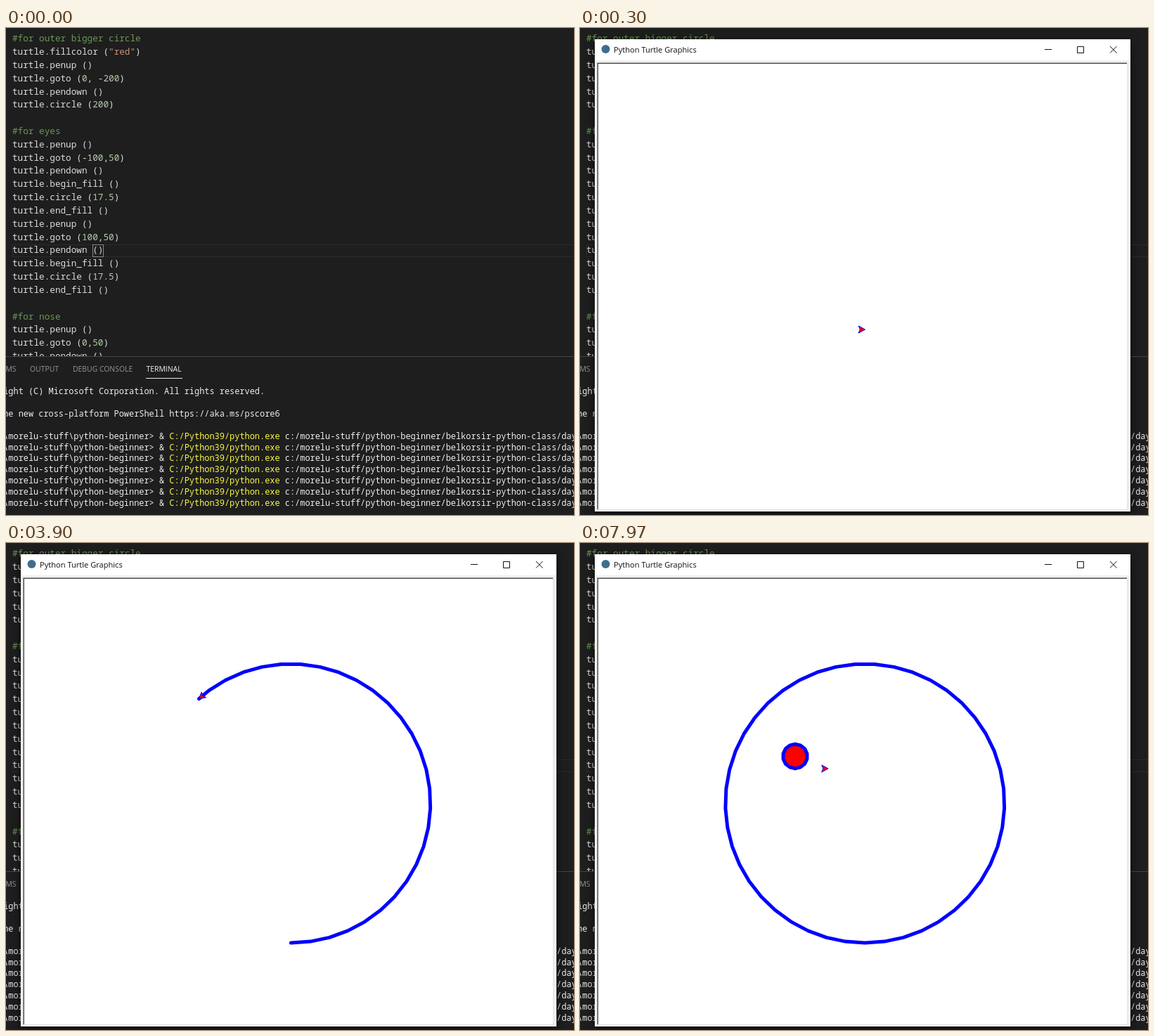
These frames come from a looping animation (808 by 693 pixels, 8 s). An HTML page:

```html
<!DOCTYPE html>
<html lang="en">
<head>
<meta charset="utf-8">
<title>Python Turtle Graphics</title>
<style>
  html, body { margin: 0; width: 100%; height: 100%; overflow: hidden; background: #1e1e1e; }
  #stage { position: absolute; left: 0; top: 0; width: 808px; height: 693px; overflow: hidden; }
  pre { position: absolute; margin: 0; font-family: "Noto Sans Mono", monospace; font-weight: 500; }
  #editor { position: absolute; width: 808px; height: 467px; overflow: hidden; }
  #code { left: 9px; top: 5.2px; font-size: 12.7px; line-height: 18.83px; color: #dcdcdc; }
  #terminal { left: -39.6px; top: 509px; font-size: 11.93px; line-height: 15.9px; color: #eee; }
  .current { position: absolute; left: 9px; top: 308px; width: 820px; height: 16px; border: 1px solid #2b2b2b; }
  .bracket { position: absolute; left: 123px; top: 308px; width: 14px; height: 16px; border: 1px solid #888; }
  .comment { color: #6a9955; }
  .string { color: #ce9178; }
  .number { color: #b5cea8; }
  .command { color: #f9f947; }
  svg { position: absolute; left: 0; top: 0; }
  text { font-family: "Open Sans", sans-serif; }
  #window { transform-origin: 21px 16px; }
  #frame { filter: drop-shadow(0 3px 7px rgba(0, 0, 0, .6)); }
</style>
</head>
<body>
<div id="stage">
  <div id="editor">
    <div class="current"></div>
    <div class="bracket"></div>
    <pre id="code"></pre>
  </div>
  <pre id="terminal"></pre>
  <svg width="808" height="693">
    <path d="M0 467.5H808" stroke="#444"/>
    <g font-size="10.4" fill="#969696">
      <text x="14.5" y="489" text-anchor="end">PROBLEMS</text>
      <text x="34" y="489">OUTPUT</text>
      <text x="95" y="489">DEBUG CONSOLE</text>
      <text x="199.5" y="489" fill="#f0f0f0">TERMINAL</text>
    </g>
    <path d="M199 498.5H251" stroke="#e7e7e7"/>

    <g id="window">
      <rect id="frame" x="21" y="16" width="762" height="672" fill="#f0f0f0"/>
      <rect x="21" y="16" width="762" height="30" fill="#fff"/>
      <rect x="24" y="49" width="755" height="637" fill="#e3e3e3"/>
      <rect x="24" y="49" width="754" height="636" fill="#a0a0a0"/>
      <rect x="25" y="50" width="753" height="635" fill="#505050"/>
      <rect x="26" y="51" width="752" height="634" fill="#fff"/>
      <circle cx="36.5" cy="30" r="6" fill="#3f6e8c"/>
      <text x="48" y="35" font-size="11.1" fill="#111">Python Turtle Graphics</text>
      <path d="M661 30.5h10M707.5 26.5h9v9h-9zM754 26l9.500 9.500M763.500 26l-9.500 9.500" fill="none" stroke="#111"/>
      <g transform="translate(405.3 370.5) scale(.9925 -.9925)" fill="none"
         stroke="#00f" stroke-width="5" stroke-linecap="round" stroke-linejoin="round">
        <polygon id="eyeFill" fill="#f00" stroke="none"/>
        <polyline id="face"/>
        <polyline id="eye"/>
        <polygon id="turtle" points="0,0 -9,5 -7,0 -9,-5" stroke-width="1"/>
      </g>
    </g>
  </svg>
</div>
<script>
const $ = id => document.getElementById(id);

// Editor and terminal text
const call = (name, args = "") => `turtle.${name} (${args})`;
const eye = x => [call("penup"), call("goto", `${x},50`), call("pendown"),
  call("begin_fill"), call("circle", "17.5"), call("end_fill")];
const source = [
  "#for outer bigger circle", call("fillcolor", '"red"'), call("penup"),
  call("goto", "0, -200"), call("pendown"), call("circle", "200"), "",
  "#for eyes", ...eye(-100), ...eye(100), "",
  "#for nose", call("penup"), call("goto", "0,50"), call("pendown")
];
const kinds = { "#": "comment", '"': "string" };
$("code").innerHTML = source.map(line =>
  line.replace(/#.*|"[^"]*"|\d+(\.\d+)?/g,
    token => `<span class="${kinds[token[0]] || "number"}">${token}</span>`)
).join("\n");

const prompt = "PS C:\\morelu-stuff\\python-beginner&gt; &amp; " +
  '<span class="command">C:/Python39/python.exe</span> ' +
  "c:/morelu-stuff/python-beginner/belkorsir-python-class/day";
$("terminal").innerHTML = [
  "Copyright (C) Microsoft Corporation. All rights reserved.", "",
  "Try the new cross-platform PowerShell https://aka.ms/pscore6", "",
  ...Array(7).fill(prompt)
].join("\n");

// Screen refreshes: [first, last, count] in ms
const LOOP = 8000;
const refreshes = [
  [70, 870, 11], [950, 1730, 11], [1810, 2590, 11], [2680, 3440, 11], [3510, 4260, 10],
  [4340, 5070, 10], [5150, 5900, 10], [5960, 6760, 11], [6840, 7570, 10], [7650, 7970, 5]
];
function lastRefresh(t) {
  const span = refreshes.filter(([first]) => first <= t).pop();
  if (!span) return 0;
  const [first, last, count] = span;
  const step = (last - first) / (count - 1);
  return first + step * Math.min(count - 1, Math.floor((t - first) / step + .35));
}

const clamp = (v, max) => Math.max(0, Math.min(max, v));
const HOP = 21.5;

// Turtle moves in a straight line in equal hops
function glide(t, start, from, to, hops) {
  const f = clamp(Math.floor((t - start) / HOP), hops) / hops;
  return { at: from.map((v, i) => v + (to[i] - v) * f), heading: 0 };
}

// Turtle draws a circle as a polygon, upwards from its lowest point
function arc([x, y], radius, sides, progress) {
  const corner = i => {
    const a = 2 * Math.PI * i / sides;
    return [x + radius * Math.sin(a), y + radius - radius * Math.cos(a)];
  };
  const whole = Math.floor(progress), part = progress - whole;
  const points = Array.from({ length: whole + 1 }, (_, i) => corner(i));
  if (part) {
    const next = corner(whole + 1);
    points.push(points[whole].map((v, i) => v + (next[i] - v) * part));
  }
  return {
    points: points.map(p => p.map(v => v.toFixed(2))).join(" "),
    at: points[points.length - 1],
    heading: (whole + .5) * 360 / sides
  };
}

const home = [0, 0], bottom = [0, -200], leftEye = [-100, 50], rightEye = [100, 50];

function draw(t) {
  const win = $("window");
  win.style.display = t < 70 ? "none" : "";
  win.style.opacity = t < 149 ? .35 : t < 229 ? .818 : 1;
  win.style.transform = `scale(${t < 149 ? .97 : t < 229 ? .991 : 1})`;

  const thirds = clamp(Math.floor((t - 570) * .02477 + .3), 135);
  const face = arc(bottom, 200, 45, thirds / 3);
  const eye = arc(leftEye, 17.5, 14, clamp(Math.floor((t - 6575) / 90), 14));
  $("face").setAttribute("points", face.points);
  $("eye").setAttribute("points", t < 6575 ? "" : eye.points);
  $("eyeFill").setAttribute("points", t < 7835 ? "" : eye.points);

  const pose =
    t < 570 ? glide(t, 190, home, bottom, 17) :
    t < 6008 ? face :
    t < 6575 ? glide(t, 6025, bottom, leftEye, 23) :
    t < 7835 ? eye :
    glide(t, 7870, leftEye, rightEye, 17);
  const turtle = $("turtle");
  turtle.setAttribute("transform", `translate(${pose.at}) rotate(${pose.heading})`);
  // The turtle is black until its colours are set
  turtle.style.fill = t < 190 ? "#000" : "#f00";
  turtle.style.stroke = t < 190 ? "#000" : "#00f";
}

const begin = performance.now();
function tick() {
  draw(lastRefresh((performance.now() - begin) % LOOP));
  requestAnimationFrame(tick);
}
tick();
</script>
</body>
</html>
```
